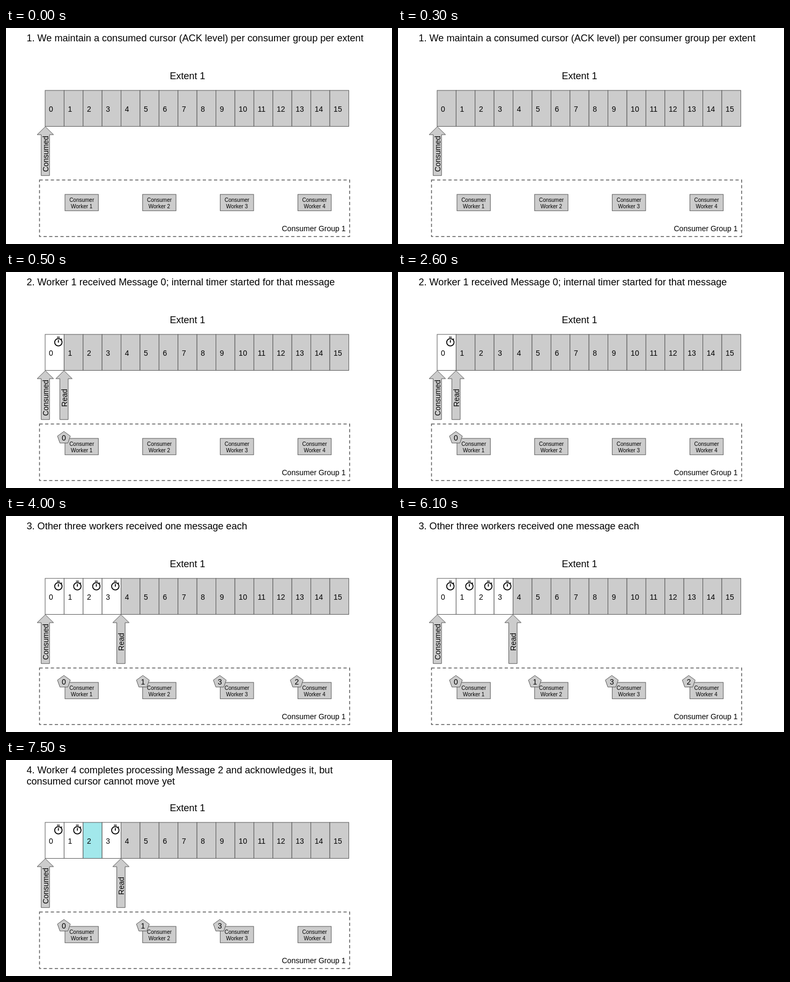
An HTML page that plays this animation: 720 px wide and 405 px high, repeating every 8 s.

```html
<!DOCTYPE html>
<html lang="en">
<head>
<meta charset="utf-8">
<title>Consumer group cursors</title>
<style>
  html, body { margin: 0; width: 100%; height: 100%; overflow: hidden; background: #fff; }
  svg { display: block; width: 720px; height: 405px; font: 14px "Liberation Sans", Arial, sans-serif; }
  .shape { fill: #ccc; stroke: #595959; stroke-width: 1; }
  .title { font-size: 18.1px; }
  .heading { font-size: 18px; }
  .worker { font-size: 10px; }
  .middle { text-anchor: middle; }
  .group { fill: none; stroke: #595959; stroke-width: 1.5; stroke-dasharray: 6 4.5; }
  .timer { fill: none; stroke: #000; stroke-width: 2; }
</style>
</head>
<body>
<svg id="stage" viewBox="0 0 720 405"></svg>
<script>
const LOOP = 8000;
const CELL = { x: 73, y: 117, width: 35.4, height: 67.5, count: 16 };
const WHITE = '#fff', ACKED = '#a2e8eb';

// cells: fill colours of the leading cells; timers: cells with a running timer;
// held: message held by each worker, null when idle.
const steps = [
  { start: 0, read: null, cells: [], timers: [], held: [],
    title: ['1. We maintain a consumed cursor (ACK level) per consumer group per extent'] },
  { start: 500, read: 1, cells: [WHITE], timers: [0], held: [0],
    title: ['2. Worker 1 received Message 0; internal timer started for that message'] },
  { start: 4000, read: 4, cells: [WHITE, WHITE, WHITE, WHITE], timers: [0, 1, 2, 3], held: [0, 1, 3, 2],
    title: ['3. Other three workers received one message each'] },
  { start: 7500, read: 4, cells: [WHITE, WHITE, ACKED, WHITE], timers: [0, 1, 3], held: [0, 1, 3, null],
    title: ['4. Worker 4 completes processing Message 2 and acknowledges it, but',
            'consumed cursor cannot move yet'] }
];

const range = (n, fn) => Array.from({ length: n }, (_, i) => fn(i)).join('');
const cellX = i => CELL.x + i * CELL.width;
const text = (x, y, content, cls = '') => `<text class="${cls}" x="${x}" y="${y}">${content}</text>`;
const rect = (x, y, w, h, fill = '#ccc') =>
  `<rect class="shape" style="fill:${fill}" x="${x}" y="${y}" width="${w}" height="${h}"/>`;

const cell = (i, fill) =>
  rect(cellX(i), CELL.y, CELL.width, CELL.height, fill) + text(cellX(i) + 7.1, 157, i);

const arrow = (x, label) => `<g transform="translate(${x} 185)">
  <path class="shape" d="M0 0L15.3 15H7.8V91.7H-7.8V15H-15.3Z"/>
  <text class="middle" transform="translate(6 51) rotate(-90)">${label}</text></g>`;

const timer = i => `<g class="timer" transform="translate(${cellX(i) + 24.7} 131.7) scale(.86)">
  <circle r="8"/><path d="M-3 -11H3M0 1V-5M6 -6L7.7 -7.7"/></g>`;

const worker = i => {
  const x = 110 + i * 144.8;
  return rect(x, 312, 62.3, 30.7) +
    text(x + 31.2, 326.4, 'Consumer', 'worker middle') +
    text(x + 31.2, 338.4, `Worker ${i + 1}`, 'worker middle');
};

const message = (value, i) => value === null ? '' :
  `<g transform="translate(${[108, 255.3, 398.8, 542.3][i]} 299)">
  <path class="shape" d="M0 0L12 8.7L7.4 21.7H-7.4L-12 8.7Z"/>${text(0, 17, value, 'middle')}</g>`;

const draw = step =>
  step.title.map((line, i) => text(38.5, 25 + i * 21, line, 'title')).join('') +
  text(338.6, 96, 'Extent 1', 'heading middle') +
  range(CELL.count, i => cell(i, step.cells[i])) +
  step.timers.map(timer).join('') +
  arrow(cellX(0) + .4, 'Consumed') +
  (step.read === null ? '' : arrow(cellX(step.read) - .2, 'Read')) +
  '<path class="group" d="M62.5 285H641V391H62.5Z"/>' +
  text(514.5, 381, 'Consumer Group 1') +
  range(4, worker) +
  step.held.map(message).join('');

const stage = document.getElementById('stage');
const origin = performance.now();
let shown = null;

function tick() {
  const time = (performance.now() - origin) % LOOP;
  const step = steps.findLast(s => s.start <= time);
  if (step !== shown) {
    stage.innerHTML = draw(step);
    shown = step;
  }
  requestAnimationFrame(tick);
}
tick();
</script>
</body>
</html>
```
